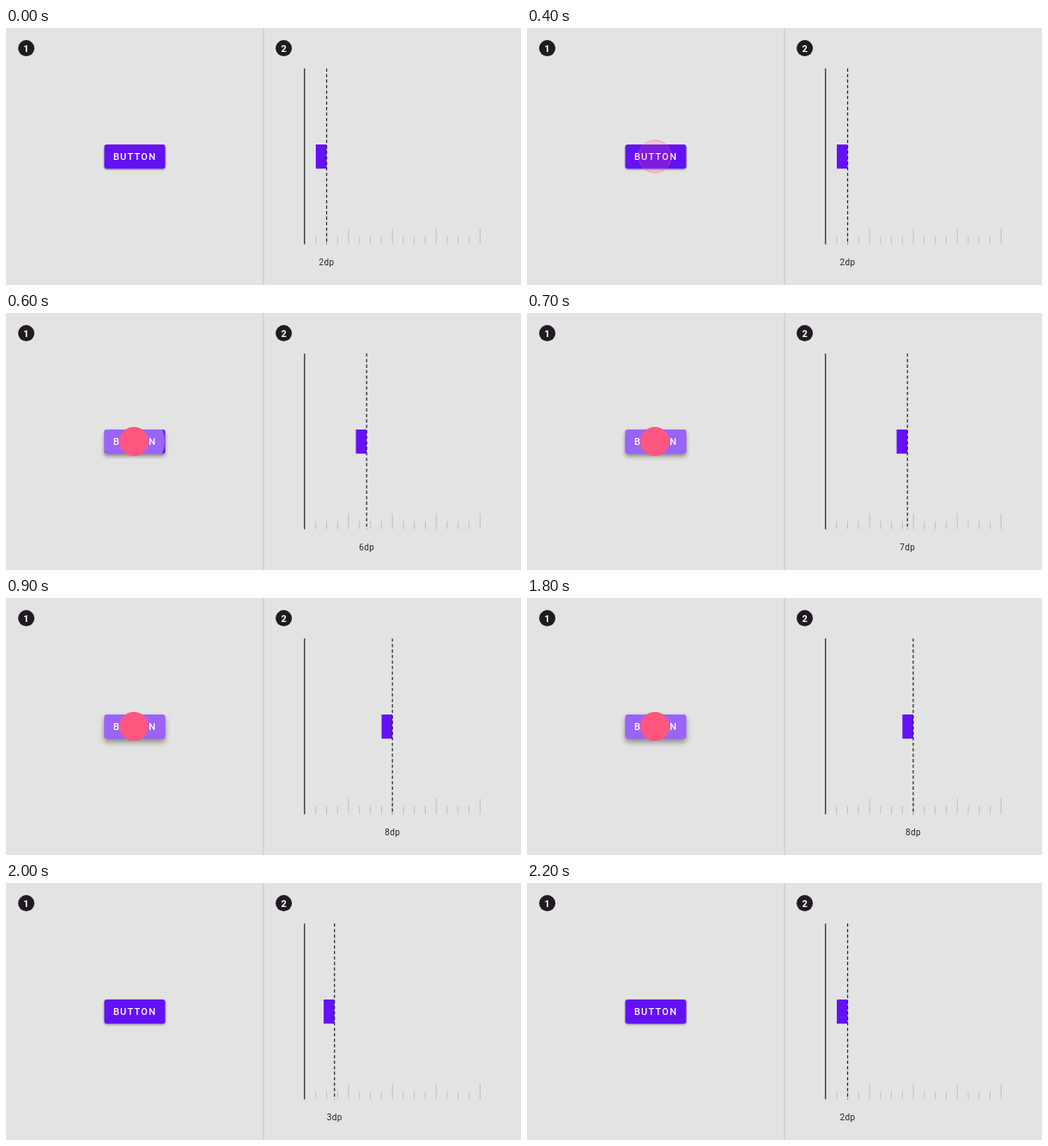
Recreate the animation shown at these times as an HTML page. Size 600x300 px, loop 2700 ms.

```html
<!DOCTYPE html>
<html lang="en">
<head>
<meta charset="utf-8">
<title>Button elevation</title>
<style>
  html, body { margin: 0; width: 100%; height: 100%; overflow: hidden; background: #e4e3e4; }
  svg { display: block; width: 100%; height: 100%; font-family: Roboto, sans-serif; }
  .badge circle { fill: #1f1b20; }
  .badge text { fill: #fff; font-size: 11px; font-weight: 700; text-anchor: middle; }
  .caption { font-size: 11px; font-weight: 500; letter-spacing: 1.25px; fill: #fff; }
  #label { font-size: 10px; letter-spacing: .4px; text-anchor: middle; fill: #252328; }
  .violet { fill: #6411f5; }
</style>
</head>
<body>
<svg viewBox="0 0 600 300">
  <defs>
    <clipPath id="buttonShape"><rect x="114.5" y="136" width="71" height="28.3" rx="3"/></clipPath>
  </defs>

  <rect x="299.5" width="1" height="300" fill="#c6c5c6"/>
  <g class="badge"><circle cx="23.6" cy="23.6" r="9.5"/><text x="23.4" y="27.5">1</text></g>
  <g class="badge"><circle cx="323.6" cy="23.6" r="9.5"/><text x="323.6" y="27.5">2</text></g>

  <rect id="button" class="violet" x="114.5" y="136" width="71" height="28.3" rx="3"/>
  <text class="caption" x="124.9" y="154">BUTTON</text>
  <g clip-path="url(#buttonShape)"><circle id="ripple" cx="149" cy="150" fill="#fff"/></g>
  <circle id="touch" cx="149" cy="150" fill="#ff5780" stroke="#ff5780" stroke-width=".8"/>

  <path id="ticks" fill="none" stroke="#bfbebf"/>
  <path d="M347.8 47.3V252.5" stroke="#1f1b20" stroke-width="1.2"/>
  <g id="surface">
    <rect class="violet" x="-12.6" y="136" width="12.6" height="28.2"/>
    <path d="M0 47.3V252.5" stroke="#252328" stroke-width="1.2" stroke-dasharray="3.8 2.6"/>
    <text id="label" x="0" y="277.3"></text>
  </g>
</svg>
<script>
const LOOP = 2700, STEP = 100;
const ORIGIN = 348, DP = 12.77;
const REST = 2, RAISED = 8;

const el = id => document.getElementById(id);
const set = (id, attrs) => {
  for (const name in attrs) el(id).setAttribute(name, attrs[name]);
};
const clamp = v => Math.min(1, Math.max(0, v));
const ramp = (t, start, length) => clamp((t - start) / length);

// Standard easing, cubic-bezier(.4, 0, .2, 1)
function ease(x) {
  let lo = 0, hi = 1;
  for (let i = 0; i < 24; i++) {
    const s = (lo + hi) / 2, r = 1 - s;
    if (1.2 * r * r * s + .6 * r * s * s + s ** 3 < x) lo = s; else hi = s;
  }
  return lo * lo * (3 - 2 * lo);
}

function elevation(t) {
  const lift = ease(ramp(t, 441, 400)) - ease(ramp(t, 1788, 350));
  return REST + (RAISED - REST) * lift;
}

function draw(t) {
  const dp = elevation(t);
  set('surface', { transform: `translate(${ORIGIN + dp * DP} 0)` });
  el('label').textContent = Math.round(dp) + 'dp';
  el('button').style.filter =
    `drop-shadow(0 ${.2 + dp * .5}px ${.6 + dp * .3}px rgba(0,0,0,.4))`;

  const release = ramp(t, 1800, 200);
  const press = ramp(t, 50, 500) ** 5;
  const touch = press * (1 - release);
  set('touch', {
    r: 17 + Math.max(0, 550 - t) * .0133 + release * 2,
    'fill-opacity': touch,
    'stroke-opacity': 4 * touch * (1 - touch)
  });
  set('ripple', {
    r: t < 480 ? 0 : 18 + (t - 500) * .18,
    opacity: .35 * (1 - release)
  });
}

let ticks = '';
for (let k = 1; k <= 16; k++) {
  ticks += `M${ORIGIN + k * DP} 252.3V${k % 4 ? 243 : 234}`;
}
set('ticks', { d: ticks });

const begin = performance.now();
function frame() {
  const t = (performance.now() - begin) % LOOP;
  draw(Math.floor(t / STEP) * STEP);
  requestAnimationFrame(frame);
}
frame();
</script>
</body>
</html>
```
